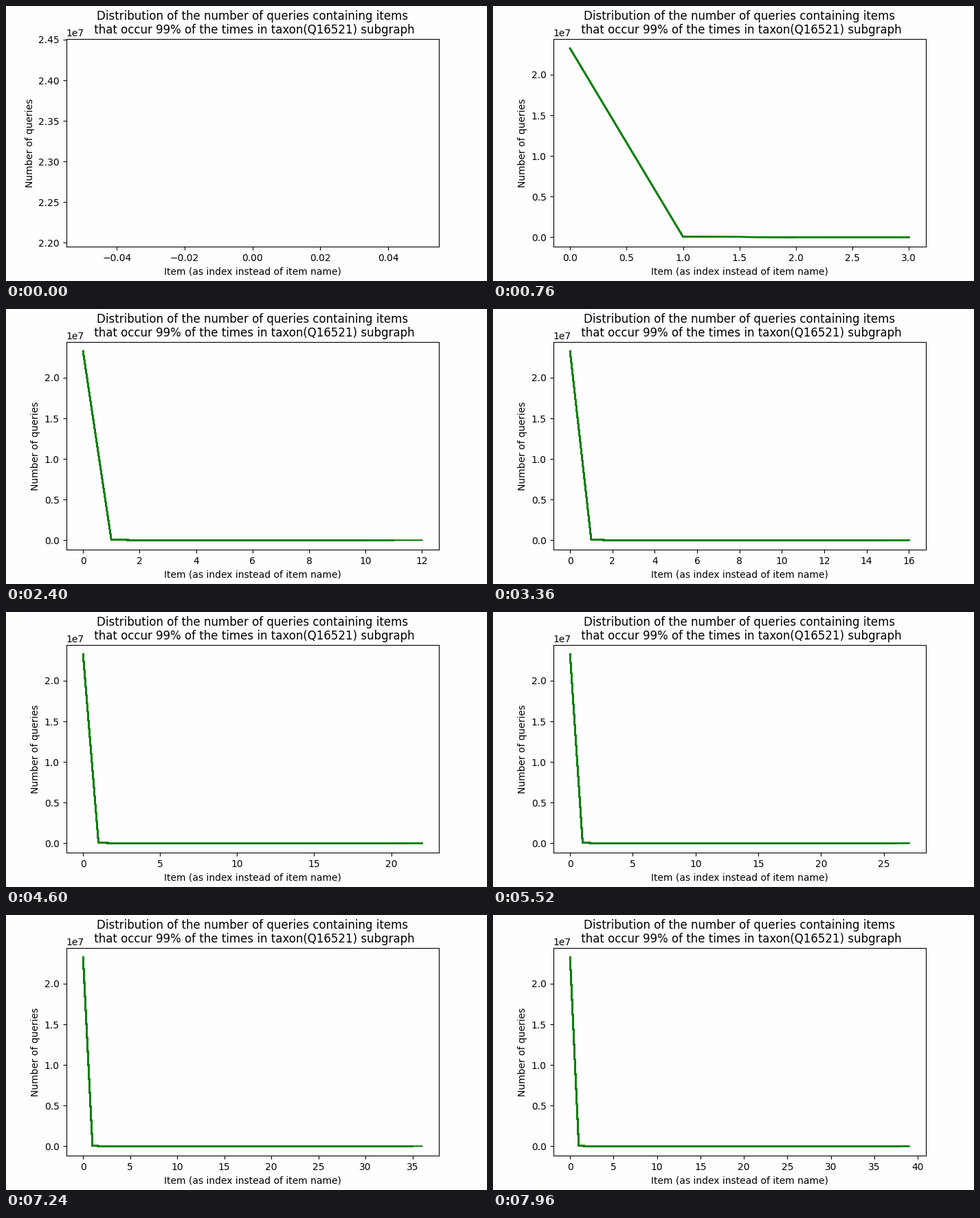
A matplotlib script that plays this animation: 700x400 px, repeating every 8000 ms.

```python
import matplotlib.pyplot as plt
import numpy as np
from matplotlib.animation import FuncAnimation

plt.rcParams["font.family"] = "DejaVu Sans"

LOOP_MS = 8000
FRAME_MS = 40
FRAMES = LOOP_MS // FRAME_MS
ITEM_MS = 201
PAPER = "#fefefe"


def item_at(frame):
    return int((frame + 0.5) * FRAME_MS // ITEM_MS)


# One dominant item, then a steep drop to a low, flat tail.
index = np.arange(item_at(FRAMES - 1) + 1)
queries = np.append(2.32307e7, 5e4 * index[1:] ** -4.0 + 300)

fig, ax = plt.subplots(figsize=(7, 4), dpi=100, facecolor=PAPER)
fig.subplots_adjust(left=0.125, right=0.9, bottom=0.125, top=0.88)
ax.set_facecolor(PAPER)
ax.set_title("Distribution of the number of queries containing items\n"
             " that occur 99% of the times in taxon(Q16521) subgraph",
             linespacing=1.1)
ax.set_xlabel("Item (as index instead of item name)")
ax.set_ylabel("Number of queries")

# Every frame plots over the lines before it, so soft edges build up.
lines = []
for frame in range(FRAMES):
    shown = item_at(frame) + 1
    lines += ax.plot(index[:shown], queries[:shown], color="green", lw=1.5)


def update(frame):
    for n, line in enumerate(lines):
        line.set_visible(n <= frame)
    ax.relim(visible_only=True)
    ax.autoscale_view()
    return lines


anim = FuncAnimation(fig, update, frames=FRAMES, interval=FRAME_MS,
                     repeat=True, repeat_delay=0)
plt.show()
```
